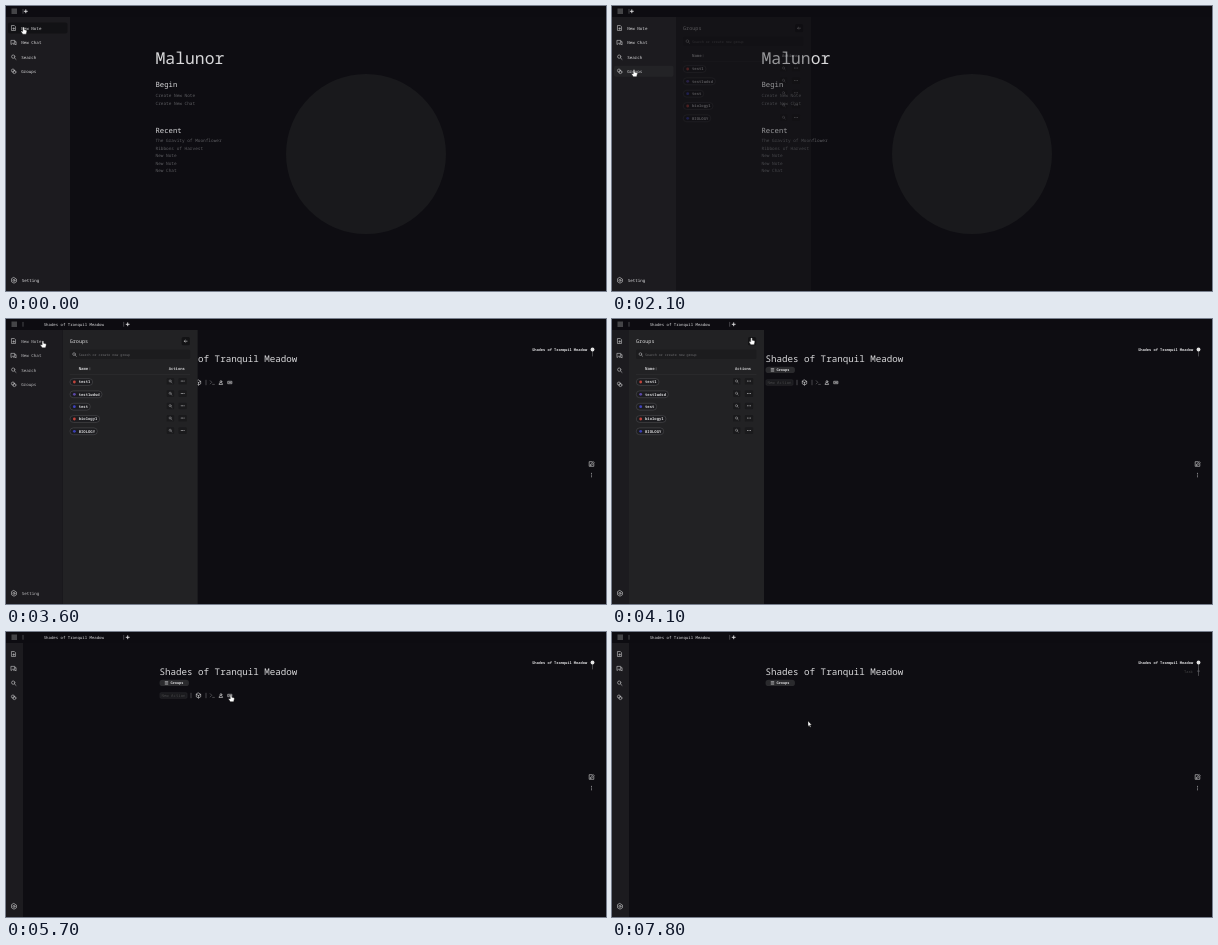
Recreate the animation shown at these times as an HTML page. Size 600 by 285 pixels, loop 8 s.

```html
<!DOCTYPE html>
<html lang="en">
<head>
<meta charset="utf-8">
<style>
html, body { margin: 0; width: 100%; height: 100%; overflow: hidden; background: #0e0d12; }
svg { display: block; }
text { font-family: "Noto Sans Mono", "DejaVu Sans Mono", monospace; text-rendering: geometricPrecision; white-space: pre; }
.line { fill: none; stroke: #c8c8ca; stroke-width: .65; stroke-linecap: round; stroke-linejoin: round; }
.dim { stroke: #66666a; }
.bold { stroke: #e4e4e6; stroke-width: .9; }
</style>
</head>
<body>
<svg id="stage" width="600" height="285" viewBox="0 0 600 285"></svg>
<script>
const LOOP = 8000, STEP = 100;
const NOTE_TITLE = 'Shades of Tranquil Meadow';

// Markup helpers; text is placed by the vertical centre of its capitals.
const text = (x, y, size, str, fill = '#d8d8da', weight = 400) =>
  `<text x="${x}" y="${y + size * .36}" font-size="${size}" fill="${fill}" font-weight="${weight}">${str}</text>`;
const rect = (x, y, w, h, fill, rx = 0, more = '') =>
  `<rect x="${x}" y="${y}" width="${w}" height="${h}" fill="${fill}" rx="${rx}" ${more}/>`;
const dot = (x, y, r, fill) => `<circle cx="${x}" cy="${y}" r="${r}" fill="${fill}"/>`;
const icon = (x, y, d, cls = '', scale = 1) =>
  `<path class="line ${cls}" transform="translate(${x} ${y}) scale(${scale})" d="${d}"/>`;
const group = (id, body) => `<g id="${id}">${body}</g>`;

const ICONS = {
  note: 'M-2-2.7H.7L2-1.4V2.7H-2ZM-.9 .6H.9M0-.3V1.5',
  chat: 'M-2.6-2.3H1.2V.8H-1.2L-2.6 2ZM1.2-.9H2.6V2.6L1.4 1.8H-.4',
  search: 'M1.3-.4A1.8 1.8 0 1 1-2.3-.4A1.8 1.8 0 1 1 1.3-.4M.8 1L2.5 2.6',
  groups: 'M.9-.8A1.7 1.7 0 1 1-2.5-.8A1.7 1.7 0 1 1 .9-.8M2.5 .8A1.7 1.7 0 1 1-.9 .8A1.7 1.7 0 1 1 2.5 .8',
  gear: 'M0-2.8L2.4-1.4V1.4L0 2.8L-2.4 1.4V-1.4ZM1 0A1 1 0 1 1-1 0A1 1 0 1 1 1 0',
  plus: 'M-1.5 0H1.5M0-1.5V1.5',
  cube: 'M0-2.5L2.2-1.2V1.3L0 2.5L-2.2 1.3V-1.2ZM-2.2-1.2L0 0L2.2-1.2M0 0V2.5',
  prompt: 'M-2-1.8L-.4-.2L-2 1.4M.4 1.9H2.2',
  flask: 'M-1.6 2H1.6L.9 .2H-.9ZM.9-1A.9 .9 0 1 1-.9-1A.9 .9 0 1 1 .9-1',
  keys: 'M-1.9-1.2H1.9V1.2H-1.9ZM-1 0H1',
  edit: 'M.5-2.3H-2.3V2.3H2.3V-.3M-1 1.2L-.8 0L1.8-2.4L2.6-1.6L.2 1Z',
};

const MENU = [['note', 'New Note', 22], ['chat', 'New Chat', 36.5], ['search', 'Search', 51], ['groups', 'Groups', 65.3]];
const TAGS = [['test1', '#c0443c', 63], ['test1wdsd', '#5b48a8', 75.3], ['test', '#4044c0', 87.7],
  ['biology1', '#c0443c', 100], ['BIOLOGY', '#3a3fb4', 112.3]];

const dots = (x, y, gap, vertical) => [-1, 0, 1].map(i =>
  dot(x + (vertical ? 0 : i * gap), y + (vertical ? i * gap : 0), .5, '#b8b8ba')).join('');

const home = dot(360, 148, 80, '#19191c')
  + text(149.5, 52.3, 16.4, 'Malunor')
  + text(149.5, 78.7, 7.25, 'Begin') + text(149.5, 124.3, 7.25, 'Recent')
  + [['Create New Note', 89.2], ['Create New Chat', 97], ['The Gravity of Moonflower', 134.3],
     ['Ribbons of Harvest', 142], ['New Note', 149.6], ['New Note', 157.2], ['New Chat', 164.8]]
    .map(([label, y]) => text(149.5, y, 4.42, label, '#5c5c60')).join('');

const toolbar = rect(154, 60.8, 27, 5.4, '#19191c', 1, 'stroke="#333336" stroke-width=".5"')
  + text(155.5, 63.5, 4, 'New Action', '#47474a')
  + icon(185, 63.5, 'M0-2.3V2.3', 'dim') + icon(192.5, 63.5, ICONS.cube) + icon(200, 63.5, 'M0-2.3V2.3', 'dim')
  + icon(206.2, 63.5, ICONS.prompt, 'dim') + icon(215, 63.5, ICONS.flask) + icon(224, 63.5, ICONS.keys);

const note = text(153.5, 39.2, 9.2, NOTE_TITLE)
  + rect(153.5, 47.7, 29.5, 6.4, '#2a2a2d', 3.2)
  + icon(160.5, 50.9, 'M-1.3-1.3H1.3M-1.3 0H1.3M-1.3 1.3H1.3') + text(164.5, 50.9, 3.6, 'Groups', '#d0d0d2', 600)
  + group('chevron', icon(442, 51.3, 'M-.8-1.6L.8 0L-.8 1.6'))
  + group('toolbar', toolbar)
  + text(526, 30.7, 3.68, NOTE_TITLE, '#dcdcde', 600)
  + icon(586.5, 30.5, 'M0 0V6.5', 'dim') + dot(586.5, 30.5, 1.9, '#e4e4e4')
  + group('task', text(572, 39.3, 3.68, 'Task', '#47474a') + icon(586.5, 37, 'M0 0V6.5', 'dim') + dot(586.5, 39.2, 1.1, '#55555a'))
  + icon(585.5, 145, ICONS.edit) + dots(585.5, 156, 1.7, true);

const panel = rect(64, 11, 135, 274, '#222224')
  + text(71, 22, 5.15, 'Groups') + rect(183, 18, 8.2, 8.2, '#131315', 1.5)
  + icon(187, 22.2, 'M1.4 0H-1.4M-.4-1L-1.4 0L-.4 1')
  + rect(71, 30.5, 120.5, 9.6, '#1c1c1e', 1.5) + icon(75.8, 35.4, ICONS.search, '', .75)
  + text(80, 35.4, 3.3, 'Search or create new group', '#707073')
  + text(80, 49.8, 4, 'Name', '#c8c8ca', 600) + icon(91.2, 49.8, 'M0-1V1', 'dim') + text(170, 49.6, 3.85, 'Actions', '#c8c8ca', 600)
  + rect(71, 55.3, 120.5, .5, '#303033')
  + TAGS.map(([name, color, y]) =>
      rect(71.3, y - 3.4, 11 + 2.34 * name.length, 6.8, '#1c1c1f', 3.4, 'stroke="#4c4c4f" stroke-width=".6"')
      + dot(75.7, y, 1.4, color) + text(80, y, 3.9, name, '#d0d0d2', 600)
      + rect(168, y - 4, 7.5, 6.6, '#1a1a1c', 1.2) + rect(179.8, y - 4, 8.4, 6.6, '#1a1a1c', 1.2)
      + icon(171.8, y - .8, ICONS.search, '', .6) + dots(184, y - .9, 1.4)).join('');

const sidebar = rect(0, 11, 64, 274, '#1c1b1f')
  + group('active', rect(2, 59.8, 59.5, 11, '#232326', 2)) + group('hover', rect(2, -5.5, 59.5, 11, '#121215', 2))
  + MENU.map(([name, , y]) => icon(7.7, y, ICONS[name], '', .92)).join('') + icon(8, 274.4, ICONS.gear)
  + group('labels', MENU.map(([, label, y]) => text(15.3, y, 4.2, label)).join('') + text(15.8, 274.4, 4.2, 'Setting'));

const topbar = rect(0, 0, 600, 11, '#0d0c11') + rect(5.5, 2.5, 5.5, 5.5, '#444447')
  + icon(17, 5.3, 'M0-2V2', 'dim')
  + group('tab', text(37.7, 5.5, 4.03, NOTE_TITLE) + icon(117.7, 5.3, 'M0-2V2', 'dim'))
  + group('plus', icon(0, 5.3, ICONS.plus, 'bold'));

const HAND = 'M-.8 .7Q0-.5 .8 .7V2.7L2.9 3.2Q3.6 3.6 3.3 4.7L2.6 7.2H-.7L-2.5 4.5Q-2.2 3.4-.8 4.4Z';
const ARROW = 'M0 0V5.4L1.2 4.3L2.1 6.2L3 5.8L2.1 3.9H3.7Z';

const stage = document.getElementById('stage');
stage.innerHTML = group('home', home) + group('note', note) + group('panel', panel)
  + `<svg id="sidebar" width="64" height="285">${sidebar}</svg>` + topbar
  + `<path id="cursor" fill="#fff" stroke="#111" stroke-width=".4"/>`;
const $ = id => document.getElementById(id);
const show = (id, amount) => $(id).setAttribute('opacity', Number(amount));
const move = (id, x, y = 0) => $(id).setAttribute('transform', `translate(${x} ${y})`);

// Cursor path: time, x, y of the tip
const PATH = [[0, 17.5, 21], [500, 23.5, 36], [900, 22, 49.5], [1300, 22, 63.5], [2400, 22, 63.5], [2800, 25, 23],
  [3100, 25, 22], [3500, 25, 22], [4000, 139.5, 18.5], [4300, 139.5, 18.7], [4800, 221, 61], [5100, 189.5, 63],
  [5700, 225, 62.5], [6000, 221, 62], [6300, 191.8, 62], [6500, 191.8, 62], [7300, 241, 105], [7800, 196, 89], [LOOP, 196, 89]];
const smooth = u => u * u * (3 - 2 * u);
const ramp = (t, from, to) => Math.min(1, Math.max(0, (t - from) / (to - from)));

function cursorAt(t) {
  const i = PATH.findIndex(p => p[0] > t);
  const [t0, x0, y0] = PATH[i - 1], [t1, x1, y1] = PATH[i];
  const u = smooth(ramp(t, t0, t1));
  return [x0 + (x1 - x0) * u, y0 + (y1 - y0) * u];
}

function draw(t) {
  const opened = t >= 3000;
  const fold = smooth(ramp(t, 3500, 3900));
  const [x, y] = cursorAt(t);

  show('home', !opened);
  show('note', opened);
  show('tab', opened);
  move('plus', opened ? 121.7 : 19.8);
  show('chevron', t < 3600);
  show('toolbar', t < 7400);
  show('task', t >= 7400);

  show('panel', t < 2100 || t >= 4300 ? 0 : .35 + .65 * ramp(t, 2100, 2400));
  move('panel', -47 * fold);
  $('sidebar').setAttribute('width', 64 - 47 * fold);
  show('labels', 1 - fold);

  const row = MENU.find(m => Math.abs(m[2] - y - 2) < 7.2);
  show('active', t >= 2000 && t < 3600);
  show('hover', row && x < 62 && row[1] !== 'Groups' && t < 3600 ? 1 : 0);
  if (row) move('hover', 0, row[2]);

  $('cursor').setAttribute('d', t < 6600 ? HAND : ARROW);
  move('cursor', x, y);
}

const start = performance.now();
function tick() {
  const t = (performance.now() - start) % LOOP;
  draw(Math.floor(t / STEP) * STEP);
  requestAnimationFrame(tick);
}
tick();
</script>
</body>
</html>
```
